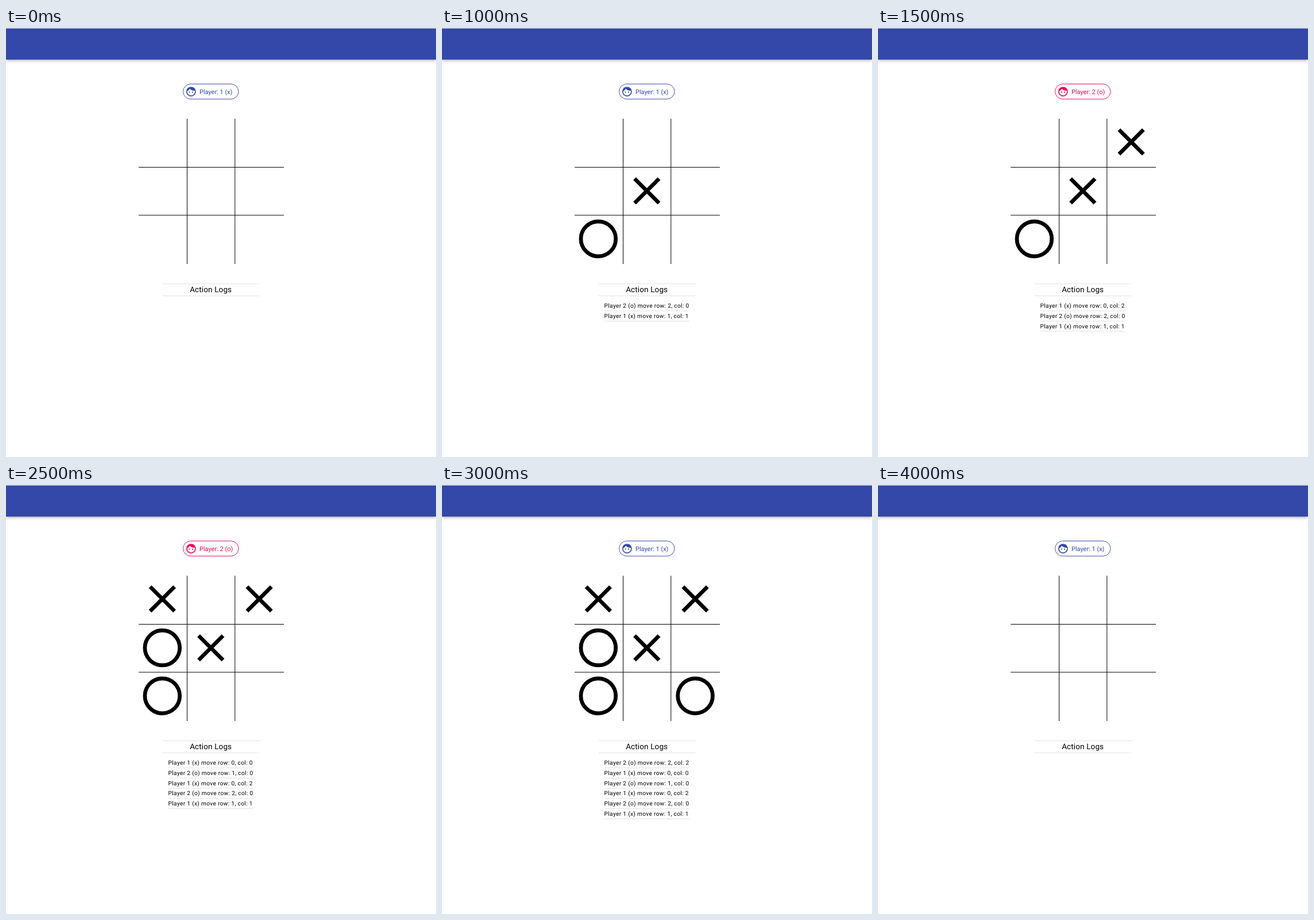
Write an HTML page that moves like this. It is 749 px wide and 747 px high and loops after 4.5 s.

```html
<!DOCTYPE html>
<html lang="en">
<head>
<meta charset="utf-8">
<title>Tic-tac-toe</title>
<style>
  :root { --blue: #3348a8; --pink: #f50057; }
  html, body { margin: 0; width: 100%; height: 100%; overflow: hidden; background: #fff; }
  body { position: relative; }
  svg { position: absolute; left: 0; top: 0; font-family: Roboto, sans-serif; text-rendering: geometricPrecision; }
  .bar, .shade, .dialog { position: absolute; }
  .bar {
    left: 0; top: 1px; width: 749px; height: 54px; background: var(--blue);
    box-shadow: 0 1.7px 3.4px -.8px rgba(0,0,0,.2), 0 3.4px 4.2px rgba(0,0,0,.14), 0 .8px 8.4px rgba(0,0,0,.12);
  }
  .edge { position: absolute; left: 0; top: 0; width: 749px; height: 1px; background: #d3d3d3; }
  .shade { left: 0; top: 1px; width: 749px; height: 746px; background: rgba(0,0,0,.5); }
  .dialog {
    left: 226px; top: 343px; width: 260.5px; height: 141.5px; border-radius: 3.4px; background: #fff;
    box-shadow: 0 9px 13px -6px rgba(0,0,0,.2), 0 20px 32px 2.5px rgba(0,0,0,.14), 0 8px 39px 7px rgba(0,0,0,.12);
  }
  .line { stroke: #dedede; stroke-width: .9; }
  .grid { stroke: #000; stroke-width: 1; }
  .chip { font-size: 10.97px; }
  .chip rect { fill: none; stroke: currentColor; stroke-width: .95; }
  .chip text, .face { fill: currentColor; }
  .heading { font-size: 13.5px; letter-spacing: .127px; }
  .log { font-size: 10.13px; letter-spacing: .338px; }
  .title { font-size: 16.88px; font-weight: 500; letter-spacing: .127px; fill: #212121; }
  .question { font-size: 13.5px; letter-spacing: .127px; fill: #757575; }
  .button { font-size: 11.8px; font-weight: 500; letter-spacing: .337px; }
</style>
</head>
<body>
<svg width="749" height="747" viewBox="0 0 749 747">
  <g id="turn" class="chip">
    <rect x="308.5" y="97.5" width="96.5" height="26.3" rx="13.15"/>
    <g class="face" transform="translate(312.2 100.7) scale(.844)">
      <circle cx="12" cy="12" r="10"/>
      <path fill="#fff" d="M12 20c-4.41 0-8-3.59-8-8 0-.29.02-.58.05-.86 2.36-1.05 4.23-2.98 5.21-5.37C11.07 8.33 14.05 10 17.42 10c.78 0 1.53-.09 2.25-.26.21.71.33 1.47.33 2.26 0 4.41-3.59 8-8 8z"/>
      <circle cx="9" cy="13" r="1.25"/>
      <circle cx="15" cy="13" r="1.25"/>
    </g>
    <text id="player" x="337" y="114.9"></text>
  </g>
  <g id="result" class="chip" color="#3348a8">
    <rect x="281.5" y="97.5" width="163" height="26.3" rx="13.15"/>
    <text x="363" y="114.9" text-anchor="middle">Game over! Player 1 (x) wins.</text>
  </g>
  <g id="page">
    <path class="grid" d="M315.5 158V411M398.8 158V411M231 242.5H484M231 326H484"/>
    <g id="marks"></g>
    <path class="line" d="M273 445.4H441.5M273 466.4H441.5"/>
    <text class="heading" x="356.7" y="460" text-anchor="middle">Action Logs</text>
    <g id="logs" class="log"></g>
  </g>
</svg>
<div class="bar"></div>
<div class="edge"></div>
<div id="modal">
  <div class="shade"></div>
  <div class="dialog"></div>
  <svg width="749" height="747" viewBox="0 0 749 747">
    <text class="title" x="246.2" y="375.8">Player - 1 wins!</text>
    <text class="question" x="246.2" y="417.8">Would you like to start a new game?</text>
    <text class="button" x="383" y="466.9" fill="#f50057">NO</text>
    <text class="button" x="441.8" y="466.9" fill="#3348a8">YES</text>
  </svg>
</div>
<script>
  const STEP = 500, LOOP = 4500;
  const moves = [[1, 1], [2, 0], [0, 2], [1, 0], [0, 0], [2, 2], [0, 1]];
  const colX = [272.3, 356.8, 441.1], rowY = [198.4, 283.6, 367.2];
  const el = id => document.getElementById(id);
  const show = (id, on) => { el(id).style.display = on ? '' : 'none'; };

  function mark([row, col], i) {
    const shape = i % 2
      ? '<circle r="9" fill="none" stroke="#000" stroke-width="2"/>'
      : '<path d="M-6.3-6.3 6.3 6.3M6.3-6.3-6.3 6.3" stroke="#000" stroke-width="2"/>';
    return `<g transform="translate(${colX[col]} ${rowY[row]}) scale(3.376)">${shape}</g>`;
  }

  function logRow([row, col], i, count) {
    const y = 487 + (count - 1 - i) * 17.75;
    const who = i % 2 ? '2 (o)' : '1 (x)';
    return `<text x="282.6" y="${y}">Player ${who} move row: ${row}, col: ${col}</text>` +
      `<path class="line" d="M283 ${y + 5.6}H430.7"/>`;
  }

  function render(count) {
    const played = moves.slice(0, count);
    const over = count === moves.length;
    const second = count % 2 === 1;
    el('marks').innerHTML = played.map(mark).join('');
    el('logs').innerHTML = played.map((move, i) => logRow(move, i, count)).join('');
    el('player').textContent = second ? 'Player: 2 (o)' : 'Player: 1 (x)';
    el('turn').style.color = second ? 'var(--pink)' : 'var(--blue)';
    // The scrollbar disappears behind the dialog, so the page recentres.
    el('page').setAttribute('transform', `translate(${over ? 6.1 : 0} 0)`);
    show('turn', !over);
    show('result', over);
    show('modal', over);
  }

  const start = performance.now();
  let shown = -1;
  function tick() {
    const time = (performance.now() - start) % LOOP;
    const count = Math.floor(time / STEP) % (moves.length + 1);
    if (count !== shown) render(shown = count);
    requestAnimationFrame(tick);
  }
  tick();
</script>
</body>
</html>
```
